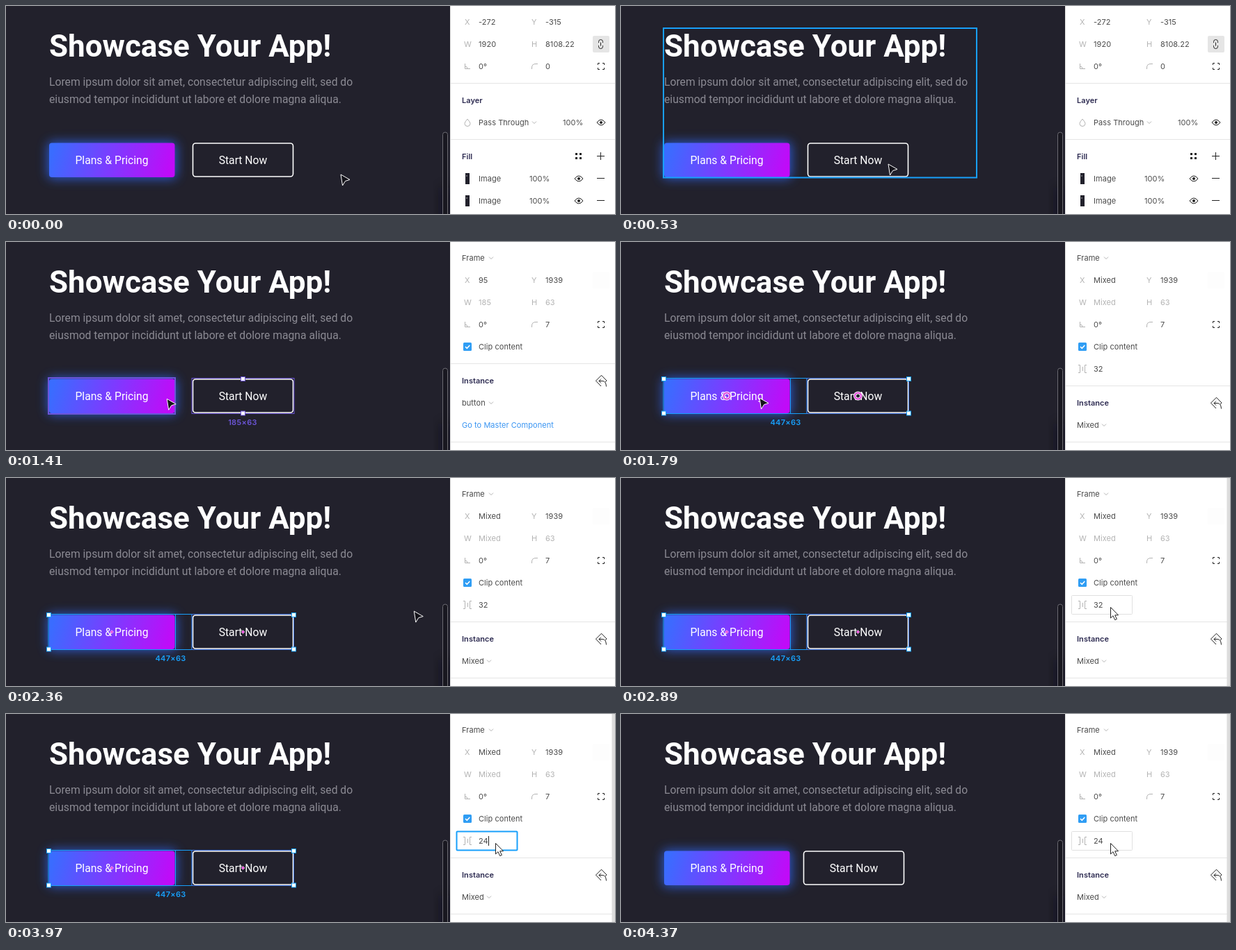
Recreate the animation shown at these times as an HTML page. Size 875 by 300 pixels, loop 5.76 s.

```html
<!DOCTYPE html>
<html lang="en">
<head>
<meta charset="utf-8">
<title>Spacing demo</title>
<style>
  html, body { margin: 0; height: 100%; overflow: hidden; background: #22212c; }
  svg { display: block; }
  text { white-space: pre; }
  .site { font-family: Roboto, sans-serif; font-size: 15.7px; fill: #fff; }
  .panel { font: 11px Inter, sans-serif; letter-spacing: .05px; fill: #4a4a4a; }
  .panel .dim { fill: #b3b3b3; }
  .panel .head { font-weight: 600; fill: #2c2a50; }
  .line { fill: none; stroke: #b3b3b3; }
  .ink { fill: none; stroke: #222; }
  .blue { fill: none; stroke: #18a0fb; }
  .purple { fill: none; stroke: #6c55d8; }
  .size { font: 600 11px Inter, sans-serif; letter-spacing: .3px; text-anchor: middle; }
</style>
</head>
<body>
<svg width="875" height="300" viewBox="0 0 875 300">
  <defs>
    <linearGradient id="ramp" gradientUnits="userSpaceOnUse" x1="70" y1="198" x2="235" y2="246">
      <stop stop-color="#3a6cff"/><stop offset=".5" stop-color="#7e3aff"/><stop offset="1" stop-color="#c10af8"/>
    </linearGradient>
    <filter id="glow" x="-100%" y="-100%" width="300%" height="300%"><feGaussianBlur stdDeviation="8"/></filter>
    <path id="chev" class="line" d="M-3-1.5l3 3 3-3"/>
    <g id="eye"><path class="ink" d="M-6 0Q0-8 6 0Q0 8-6 0z"/><circle r="2" fill="#222"/></g>
    <path id="angle" class="line" d="M-3.5-4v7.500h7.500M-3.500 0q3.500 0 3.500 3.500"/>
    <path id="round" class="line" d="M-4.500 4v-2q0-5.500 5.500-5.500h3"/>
    <path id="full" class="ink" d="M-4.500-2v-2.500h2.500M2-4.500h2.500v2.500M4.500 2v2.500h-2.500M-2 4.500h-2.500v-2.500"/>
    <rect id="knob" x="-3" y="-3" width="6" height="6" fill="#fff"/>
    <g id="image">
      <rect x="660" y="-8" width="6" height="16" fill="#22212c"/><path d="M661-4h2" stroke="#aaa"/>
      <text x="679" y="4">Image</text><text x="752" y="4">100%</text>
      <use href="#eye" x="823"/><path class="ink" d="M849-.5h11"/>
    </g>
  </defs>

  <g class="site">
    <text x="62" y="73" font-size="44" font-weight="700">Showcase Your App!</text>
    <g fill="#8b8a93">
      <text x="62" y="115">Lorem ipsum dolor sit amet, consectetur adipiscing elit, sed do</text>
      <text x="62" y="140">eiusmod tempor incididunt ut labore et dolore magna aliqua.</text>
    </g>
    <rect x="60" y="196" width="185" height="53" rx="6" fill="#2f6bff" opacity=".75" filter="url(#glow)"/>
    <rect x="62" y="197.500" width="180.500" height="49.500" rx="4" fill="url(#ramp)"/>
    <text x="152" y="227.500" text-anchor="middle">Plans &amp; Pricing</text>
    <g id="start">
      <rect x="268.500" y="198" width="144" height="48" rx="4" fill="none" stroke="#fff" stroke-width="1.600"/>
      <text x="340.500" y="227.500" text-anchor="middle">Start Now</text>
    </g>
  </g>
  <rect x="626" y="262" width="12" height="60" fill="#0c0b12" opacity=".6" filter="url(#glow)"/>
  <rect x="627.500" y="182" width="7" height="130" rx="3.500" fill="#191820" stroke="#6b6a72"/>

  <rect id="hoverAll" class="blue" x="61" y="32" width="450" height="215.500" stroke-width="2"/>
  <g data-on="620 1720">
    <rect class="purple" x="267" y="196.500" width="147" height="51"/>
    <g class="purple"><use href="#knob" x="340.500" y="197.500"/><use href="#knob" x="340.500" y="247"/></g>
    <text class="size" x="340" y="264" fill="#6c55d8">185×63</text>
  </g>
  <rect id="hoverPlans" class="purple" x="61" y="196" width="182" height="52" stroke-width="2"/>
  <g data-on="1720 4370">
    <path class="blue" d="M61 196.500h352.500v51h-352.500zM243.500 197v50M267 197v50"/>
    <rect class="purple" x="267" y="196.500" width="146.500" height="51" opacity=".5"/>
    <g class="blue">
      <use href="#knob" x="61.500" y="197.500"/><use href="#knob" x="413.500" y="197.500"/>
      <use href="#knob" x="61.500" y="247"/><use href="#knob" x="413.500" y="247"/>
    </g>
    <text class="size" x="236.500" y="264" fill="#18a0fb">447×63</text>
    <g id="rings" fill="none" stroke-width="2">
      <g stroke="#fff" stroke-width="4"><circle cx="152" cy="222" r="4.500"/><circle cx="340.500" cy="222" r="4.500"/></g>
      <g stroke="#e03fd8"><circle cx="152" cy="222" r="4.500"/><circle cx="340.500" cy="222" r="4.500"/></g>
    </g>
    <path id="dots" fill="#f04ce0" stroke="#fff" stroke-width=".5" d="M152 219.500l2.500 2.500-2.500 2.500-2.500-2.500zM340.500 219.500l2.500 2.500-2.500 2.500-2.500-2.500z"/>
  </g>

  <g class="panel">
    <rect x="638" width="237" height="300" fill="#fff"/>
    <path d="M638.500 0v300" stroke="#e5e5e5"/>

    <g data-on="0 620">
      <path d="M639 111.500h236M639 192.500h236" stroke="#e5e5e5"/>
      <g class="dim">
        <text x="659" y="27">X</text><text x="755" y="27">Y</text>
        <text x="658" y="59">W</text><text x="755" y="59">H</text>
      </g>
      <text x="679" y="27">-272</text><text x="775" y="27">-315</text>
      <text x="679" y="59">1920</text><text x="775" y="59">8108.22</text>
      <rect x="843" y="43" width="24" height="24" rx="2" fill="#e5e5e5"/>
      <path class="ink" d="M851.500 53v-1.500a3 3 0 0 1 6 0v1.500M851.500 57v1.500a3 3 0 0 0 6 0v-1.500M854.500 52.500v5"/>
      <use href="#angle" x="663" y="87"/><text x="679" y="91">0°</text>
      <use href="#round" x="760" y="87"/><text x="775" y="91">0</text>
      <use href="#full" x="855" y="87"/>
      <text class="head" x="655" y="140">Layer</text>
      <path class="line" d="M663 163q-4 4.500-4 6.500a4 4 0 0 0 8 0q0-2-4-6.500z"/>
      <text x="679" y="172">Pass Through</text><use href="#chev" x="759" y="168"/>
      <text x="800" y="172">100%</text><use href="#eye" x="855" y="168"/>
      <text class="head" x="655" y="221">Fill</text>
      <path d="M818 212h3v3h-3zM824 212h3v3h-3zM818 218h3v3h-3zM824 218h3v3h-3z" fill="#222"/>
      <path class="ink" d="M849 216.500h11M854.500 211v11"/>
      <use href="#image" y="249"/><use href="#image" y="281"/>
    </g>

    <g data-on="620 5760">
      <text x="655" y="27">Frame</text><use href="#chev" x="697" y="23"/>
      <rect x="843" y="43" width="24" height="24" rx="2" fill="#fdfdfd"/>
      <g class="dim">
        <text x="659" y="59">X</text><text x="755" y="59">Y</text>
        <text x="658" y="91">W</text><text x="755" y="91">H</text>
        <text x="679" y="91" data-on="620 1720">185</text>
        <text x="679" y="91" data-on="1720 5760">Mixed</text>
        <text x="775" y="91">63</text>
      </g>
      <text x="679" y="59" data-on="620 1720">95</text>
      <text x="679" y="59" data-on="1720 5760">Mixed</text>
      <text x="775" y="59">1939</text>
      <use href="#angle" x="663" y="119"/><text x="679" y="123">0°</text>
      <use href="#round" x="760" y="119"/><text x="775" y="123">7</text>
      <use href="#full" x="855" y="119"/>
      <rect x="657" y="145" width="12" height="12" rx="1.500" fill="#2f9df4"/>
      <path d="M660 151l2.300 2.300 4-4.300" fill="none" stroke="#fff" stroke-width="1.500"/>
      <text x="679" y="155">Clip content</text>
      <path d="M639 288.500h236" stroke="#e5e5e5"/>

      <g data-on="1720 5760">
        <rect id="field" x="647.500" y="169.500" width="87" height="27" rx="1" fill="none"/>
        <path class="line" d="M657 177.500h2.500v11h-2.500M669 177.500h-2.500v11h2.500M663.500 180v6"/>
        <rect x="679" y="176" width="14" height="14" fill="#b3d7ff" data-on="3200 3840"/>
        <text id="gap" x="679" y="187"></text>
        <path id="caret" d="M.5 176v14" stroke="#222"/>
      </g>

      <g id="instance">
        <path d="M639 175.500h236" stroke="#e5e5e5"/>
        <text class="head" x="655" y="204">Instance</text>
        <path class="ink" d="M855 208l-7.500-7.800 8-8 7.500 7.800-2 2M852 200.500h5q5 0 5.500 8M855 197.500l-3 3 3 3"/>
        <g data-on="620 1720">
          <text x="655" y="236">button</text><use href="#chev" x="697" y="232"/>
          <text x="655" y="268" style="fill:#3a95f2">Go to Master Component</text>
        </g>
        <g data-on="1720 5760"><text x="655" y="236">Mixed</text><use href="#chev" x="694" y="232"/></g>
      </g>
    </g>
    <rect id="bar" x="870.500" width="4.500" height="300" fill="#dcdcdc"/>
  </g>

  <path id="pen" d="M1 1l13 7.500-6.500 2-4 6.500z" fill="#14131a" stroke="#fff" stroke-linejoin="round"/>
  <path id="arrow" d="M.5.500v15.500l3.500-3.300 2.700 6 2.700-1.200-2.700-5.700h4.800z" fill="#fff" stroke="#222" stroke-linejoin="round"/>
</svg>
<script>
const LOOP = 5760;
const $ = id => document.getElementById(id);
const show = (el, on) => { el.style.display = on ? '' : 'none'; };
const timed = [...document.querySelectorAll('[data-on]')]
  .map(el => [el, ...el.dataset.on.split(' ').map(Number)]);

// Pointer moves: first and last change, number of steps, start and end point
const moves = [
  [140, 530, 6, 480, 242, 383, 227],
  [620, 620, 1, 383, 227, 404, 232],
  [1000, 1570, 8, 404, 232, 198, 224],
  [1950, 2510, 8, 198, 224, 657, 185],
  [2590, 2890, 5, 657, 185, 703, 186]
];

function pointer(t) {
  let at = [480, 242];
  for (const [from, to, n, x0, y0, x1, y1] of moves) {
    if (t < from) break;
    const step = n > 1 ? Math.floor((t - from) / (to - from) * (n - 1) + .15) + 1 : 1;
    const p = Math.min(1, step / n), e = p * p * (3 - 2 * p);
    at = [x0 + (x1 - x0) * e, y0 + (y1 - y0) * e];
  }
  return at;
}

function draw(t) {
  for (const [el, from, to] of timed) show(el, t >= from && t < to);

  const [x, y] = pointer(t), inPanel = x > 638;
  for (const id of ['pen', 'arrow']) $(id).setAttribute('transform', `translate(${x} ${y})`);
  show($('pen'), !inPanel);
  show($('arrow'), inPanel);
  show($('bar'), inPanel);
  show($('hoverAll'), t < 620 && x < 413);
  show($('hoverPlans'), t < 1720 && x < 243);

  const over = x < 413;
  show($('rings'), t >= 1790 && over);
  show($('dots'), !over);
  $('start').setAttribute('transform', `translate(${t >= 4370 ? -6 : 0} 0)`);
  $('instance').setAttribute('transform', `translate(0 ${t >= 1720 ? 32 : 0})`);

  const focus = t >= 3120 && t < 4370;
  const field = $('field');
  show(field, x > 647);
  field.setAttribute('stroke', focus ? '#18a0fb' : '#e0e0e0');
  field.setAttribute('stroke-width', focus ? 2 : 1);
  $('gap').textContent = t < 3840 ? '32' : t < 3970 ? '2' : '24';
  show($('caret'), focus && (t < 3200 || t >= 3840));
  $('caret').setAttribute('transform', `translate(${t >= 3840 && t < 3970 ? 686 : 693} 0)`);
}

function tick() {
  draw(performance.now() % LOOP);
  requestAnimationFrame(tick);
}
tick();
</script>
</body>
</html>
```
